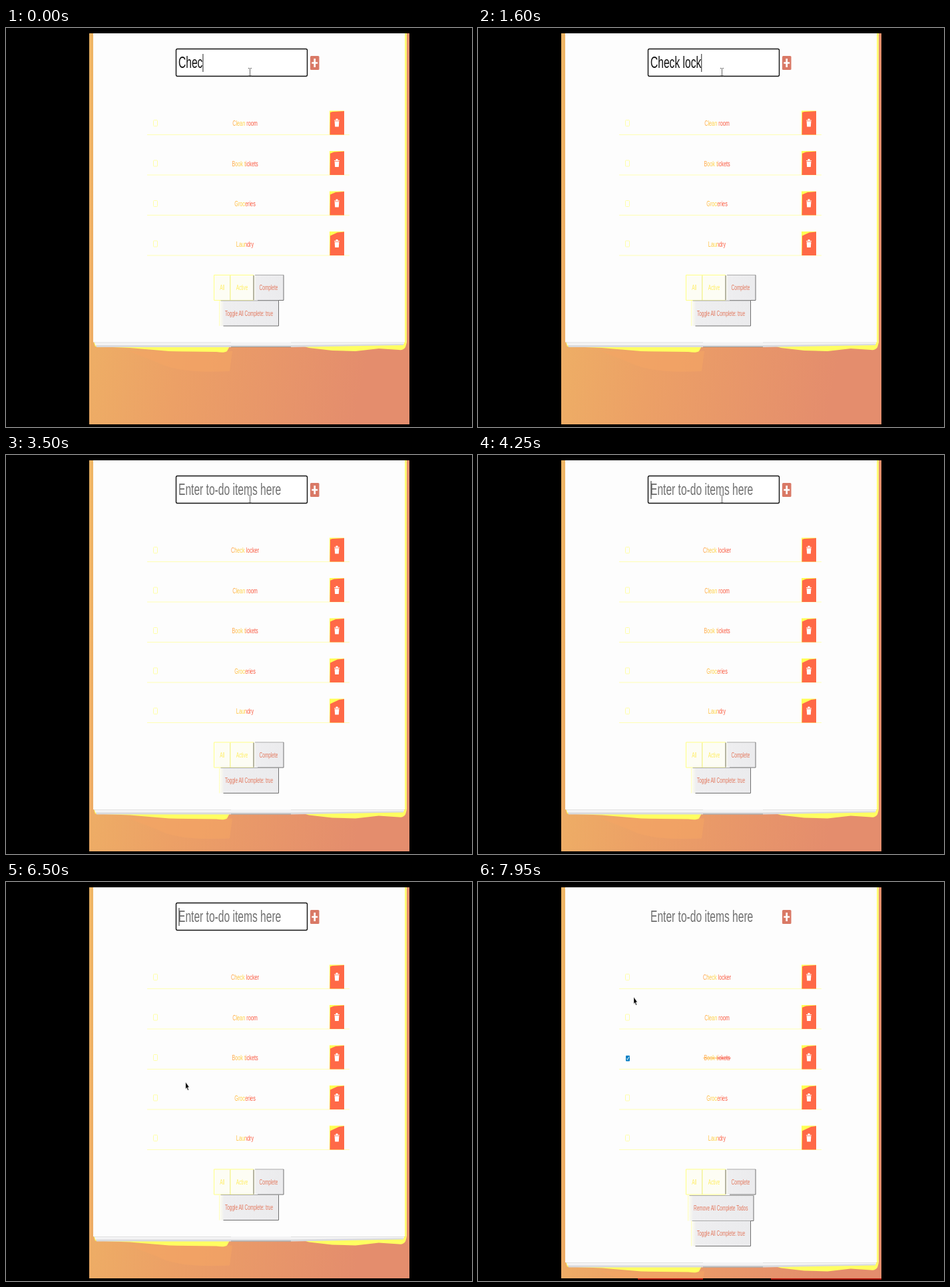
Recreate the animation shown at these times as an HTML page. Size 700 by 600 pixels, loop 8000 ms.

```html
<!DOCTYPE html>
<html lang="en">
<head>
<meta charset="utf-8">
<title>To-do list</title>
<style>
  html, body { margin: 0; width: 100%; height: 100%; overflow: hidden; background: #000; }
  svg { display: block; width: 700px; height: 600px; }
  text { font-family: "Liberation Sans", Arial, sans-serif; white-space: pre; }
  .entry { font-size: 24px; }
  .item { font-size: 11.2px; text-anchor: middle; fill: url(#itemInk); }
  .label { font-size: 10px; text-anchor: middle; fill: #e2775c; }
  .pale { fill: #ffee63; }
</style>
</head>
<body>
<svg viewBox="0 0 700 600">
  <defs>
    <linearGradient id="wall" x2="1" y2=".22">
      <stop stop-color="#efb665"/>
      <stop offset=".45" stop-color="#eca066"/>
      <stop offset="1" stop-color="#e48d6d"/>
    </linearGradient>
    <linearGradient id="itemInk" gradientUnits="userSpaceOnUse" x1="-32" x2="32">
      <stop stop-color="#ff9a50"/>
      <stop offset=".2" stop-color="#ffc044"/>
      <stop offset=".48" stop-color="#ffdc42"/>
      <stop offset=".55" stop-color="#ff6040"/>
      <stop offset="1" stop-color="#f5503c"/>
    </linearGradient>
    <linearGradient id="buttonFace">
      <stop stop-color="#fffff0"/>
      <stop offset=".08" stop-color="#eeeef0"/>
      <stop offset="1" stop-color="#ebebed"/>
    </linearGradient>
    <clipPath id="view"><rect x="125" y="8" width="481" height="588"/></clipPath>
  </defs>

  <rect width="700" height="600"/>
  <g clip-path="url(#view)">
    <rect x="125" y="8" width="481" height="588" fill="url(#wall)"/>
    <g id="sheet">
      <path d="M185 486H340L336 516Q260 520 228 503Z" fill="#f6a565" opacity=".6"/>
      <path d="M132 473H339L332 486Q328 489 316 487L245 486L186 481L134 479Z" fill="#ffff61"/>
      <path d="M428 473H602L600 480Q597 485 590 484L560 482L525 486L490 485L455 481Z" fill="#ffff61"/>
      <path d="M602 -470V473H598V-470Z" fill="#ffff75"/>
      <path d="M134 473H597V477L430 480H338L136 480Z" fill="#d9dadd"/>
      <path d="M133 472H598V475L428 477H134Z" fill="#f4f4f5"/>
      <path d="M338 479.5H428" stroke="#9a9a98"/>
      <path d="M131 -600H599V472.5H131Z" fill="#fdfdfd"/>
      <path d="M132 473H338M428 473H598" stroke="#dcdcdc" stroke-width=".8"/>
    </g>
  </g>
  <path id="redEdge" d="M240 597H338M440 597H606" stroke="#e01c10" stroke-width="1.6"/>

  <rect id="frame" x="255.5" y="31.5" width="197" height="41" rx="2" fill="#fff" stroke="#111" stroke-width="1.4"/>
  <text id="entry" class="entry" transform="translate(259 60) scale(.65 1)"></text>
  <rect id="caret" y="39" width="1" height="27" fill="#222"/>
  <rect x="457" y="42" width="13.5" height="21" rx="1.5" fill="#d97966"/>
  <path d="M463.7 46V59M459.3 52.5H468.2" stroke="#fff" stroke-width="2.7"/>

  <g id="rows"></g>
  <g id="tabs"></g>
  <g id="removeButton"></g>
  <g id="toggleButton"></g>

  <path id="beam" d="M363.8 60.5H365.6L366.5 61.5L367.4 60.5H369M366.5 61.5V71M363.8 72H365.6L366.5 71L367.4 72H369" fill="none" stroke="#555" stroke-width=".9"/>
  <path id="arrow" d="M0 0V10.5L1.7 8.3L3.2 12.3L4.5 11.6L3.1 7.8H5.4Z" stroke="#fff" stroke-width=".4"/>
</svg>

<script>
const LOOP = 8000, SQUEEZE = 0.65, ROW = 60.5, BLINK = 530;
const SUBMIT = 2950, LEAVE = 4400, CLICK = 7050;
const PHRASE = "Check locker";
const PLACEHOLDER = "Enter to-do items here";
const TASKS = ["Clean room", "Book tickets", "Groceries", "Laundry"];
const KEY_TIMES = [0, 300, 550, 850, 1050, 1250, 1500, 1800, 2070];
const PATH = [
  [4400, 366, 66], [4750, 432, 98], [5100, 475, 168], [5500, 445, 262],
  [6000, 335, 322], [6500, 270, 301], [6800, 227, 264], [7650, 227, 264], [7950, 234, 173]
];

const $ = id => document.getElementById(id);
const show = (el, on) => el.setAttribute("visibility", on ? "visible" : "hidden");
const shift = (el, x, y) => el.setAttribute("transform", `translate(${x} ${y})`);
const label = (cls, x, y, words) =>
  `<text class="${cls}" transform="translate(${x} ${y}) scale(${SQUEEZE} 1)">${words}</text>`;

function rowMarkup(name, i, done) {
  const wedge = 1 + i * 1.3;
  const box = done
    ? `<rect x="222" y="140" width="6" height="8.5" rx="1" fill="#087fc4"/>
       <path d="M223.3 144.5L224.5 146.3L226.9 141.8" fill="none" stroke="#fff"/>`
    : `<rect x="221.5" y="138.5" width="6" height="9" rx="1" fill="none" stroke="#ffffa8"/>`;
  const half = name.length * 1.72;
  const strike = done
    ? `<path d="M${359 - half} 143.8H359" stroke="#ffb044"/><path d="M359 143.8H${359 + half}" stroke="#f5503c"/>`
    : "";
  return `<g transform="translate(0 ${i * ROW})">${box}
    ${label("item", 359, 147, name)}${strike}
    <path d="M212 160.5H516" stroke="#ffffb4"/>
    <rect x="486" y="124.5" width="22" height="36" fill="#ffff55"/>
    <path d="M487 ${126 + wedge}L${488 + wedge * 2} 126L508 125V160.5H486.5Z" fill="#ff6947"/>
    <path d="M493 138.5H501V139.5H493ZM495.5 136.5H498.5V138.5H495.5ZM493.6 140.3H500.4L499.8 148.5H494.2Z" fill="#fff"/>
  </g>`;
}

function button(x, y, w, words, pale) {
  const x2 = x + w, y2 = y + 38;
  const face = pale ? "#fdfdf4" : "url(#buttonFace)";
  const edges = pale
    ? `<path d="M${x} ${y2}V${y}H${x2}M${x} ${y2}H${x2}" fill="none" stroke="#ffff86"/>
       <path d="M${x2} ${y + 1}V${y2}" stroke="#b9b593"/>`
    : `<path d="M${x + 2} ${y}H${x2}" stroke="#aaa"/>
       <path d="M${x2} ${y}V${y2}H${x + 6}" fill="none" stroke="#707070"/>
       <path d="M${x} ${y}V${y2}" stroke="#ffffc0"/>`;
  return `<rect x="${x}" y="${y}" width="${w}" height="38" fill="${face}"/>${edges}` +
    label(pale ? "label pale" : "label", x + w / 2, y + 22.5, words);
}

$("tabs").innerHTML = button(312.5, 371.5, 24.5, "All", true) +
  button(337, 371.5, 35, "Active", true) + button(372, 371.5, 45, "Complete") +
  `<path d="M372 372V409" stroke="#777"/>`;
$("removeButton").innerHTML = button(315.5, 471.5, 98.5, "Remove All Complete Todos");
$("toggleButton").innerHTML = button(320.5, 410, 89, "Toggle All Complete: true");

function pointerAt(t) {
  const next = PATH.findIndex(p => p[0] > t);
  if (next < 0) return PATH[PATH.length - 1].slice(1);
  const [t0, x0, y0] = PATH[next - 1], [t1, x1, y1] = PATH[next];
  const k = (t - t0) / (t1 - t0);
  return [x0 + (x1 - x0) * k, y0 + (y1 - y0) * k];
}

let layout;
function setLayout(added, done) {
  const key = `${added}${done}`;
  if (key === layout) return;
  layout = key;
  const names = added ? [PHRASE, ...TASKS] : TASKS;
  $("rows").innerHTML = names.map((n, i) => rowMarkup(n, i, done && i === 2)).join("");
  const drop = added ? ROW : 0, extra = done ? 39 : 0;
  shift($("tabs"), 0, drop);
  shift($("toggleButton"), 0, drop + extra);
  shift($("sheet"), 0, drop + extra);
  show($("removeButton"), done);
  show($("redEdge"), done);
}

function draw(t) {
  const added = t >= SUBMIT, done = t >= CLICK;
  setLayout(added, done);

  const keys = KEY_TIMES.filter(k => k <= t);
  const typed = PHRASE.slice(0, 3 + keys.length);
  const entry = $("entry");
  entry.textContent = added ? PLACEHOLDER : typed;
  entry.setAttribute("fill", added ? "#707070" : "#111");

  const lastInput = added ? SUBMIT : keys[keys.length - 1];
  const caretOn = Math.floor((t - lastInput) / BLINK) % 2 === 0;
  $("caret").setAttribute("x", added ? 259.5 : 259 + entry.getComputedTextLength() * SQUEEZE);
  show($("caret"), caretOn && !done);
  show($("frame"), !done);

  const moving = t >= LEAVE;
  const [x, y] = moving ? pointerAt(t) : [366, 66];
  const inField = x < 453 && y < 73;
  show($("beam"), inField);
  show($("arrow"), !inField);
  shift($("beam"), x - 366, y - 66);
  shift($("arrow"), x, y);
}

const start = performance.now();
function tick() {
  draw((performance.now() - start) % LOOP);
  requestAnimationFrame(tick);
}
tick();
</script>
</body>
</html>
```
